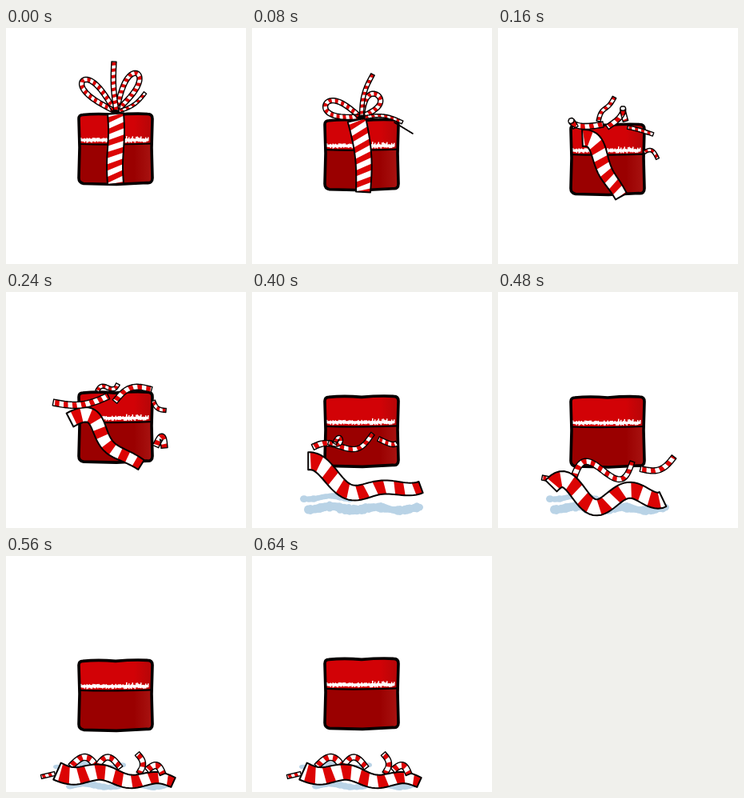
Write an HTML page with a canvas that moves like this. It is 300x295 px and loops after 0.72 s.

```html
<!DOCTYPE html>
<html lang="en">
<head>
<meta charset="utf-8">
<title>Unwrapping gift</title>
<style>
html, body { margin: 0; width: 100%; height: 100%; overflow: hidden; background: #fff; }
canvas { display: block; width: 300px; height: 295px; }
</style>
</head>
<body>
<canvas id="stage" width="300" height="295"></canvas>
<script>
const ctx = document.getElementById('stage').getContext('2d');
const STEP = 80, TICKS = 9, SAMPLES = 48, TAU = Math.PI * 2;
const BLACK = '#050000', RED = '#dc0404', SNOW = '#b9d3e6';

const mix = (a, b, t) => a + (b - a) * t;
const noise = n => { const v = Math.sin(n * 91.7) * 4375.5; return v - Math.floor(v); };
const sample = f => Array.from({ length: SAMPLES + 1 }, (_, i) => f(i / SAMPLES));

// A ribbon from one point to another, swinging sideways as a sine wave.
function strand(x0, y0, x1, y1, amp = 0, { cycles = 0.5, phase = 0, decay = 0, w = 7, endW = w } = {}) {
  const dx = x1 - x0, dy = y1 - y0, len = Math.hypot(dx, dy);
  return sample(t => {
    const off = amp * Math.sin(TAU * (cycles * t + phase)) * (1 - t) ** decay / len;
    return [x0 + dx * t - dy * off, y0 + dy * t + dx * off, mix(w, endW, t)];
  });
}

// A ribbon loop that leaves the knot, rounds its tip and returns.
function petal(x, y, tipX, tipY, spread, w = 6) {
  const dx = tipX - x, dy = tipY - y, len = Math.hypot(dx, dy);
  return sample(t => {
    const along = Math.sin(Math.PI * t), off = spread * Math.sin(TAU * t) / len;
    return [x + dx * along - dy * off, y + dy * along + dx * off, w];
  });
}

const wrapped = {
  slant: 8, period: 15,
  band: strand(137, 107, 137, 195, -1, { cycles: 1, w: 20 }),
  thin: [
    petal(136, 104, 96, 66, 8),
    petal(138, 104, 164, 57, 8),
    strand(138, 104, 135, 42, -2, { w: 6 }),
    strand(141, 104, 174, 81, 4, { w: 4 })
  ]
};

const loosened = {
  slant: 8, period: 15,
  band: strand(131, 115, 139, 205, -4, { w: 23, endW: 18 }),
  thin: [
    petal(135, 111, 92, 96, 9),
    petal(137, 111, 157, 84, 9),
    strand(137, 109, 151, 58, -4, { w: 5 }),
    strand(140, 112, 188, 118, -5, { w: 4 }),
    strand(178, 118, 201, 132, 0, { w: 0.4 })
  ]
};

const slipping = {
  slant: 0, period: 21,
  band: strand(80, 160, 169, 216, -30, { cycles: 1, decay: 2, w: 19, endW: 14 }),
  thin: [
    strand(59, 138, 128, 130, 7, { w: 8 }),
    strand(136, 137, 182, 122, -10),
    strand(114, 124, 140, 115, -4, { cycles: 1, w: 5 }),
    strand(184, 136, 200, 148, 4, { w: 5 }),
    strand(187, 193, 198, 195, -13, { w: 8 })
  ]
};

const falling = {
  slant: 5, period: 24,
  band: strand(74, 180, 216, 229, 34, { w: 24, endW: 10 }),
  thin: [
    strand(58, 154, 134, 142, 24, { decay: 0.4, w: 7, endW: 5 }),
    petal(136, 144, 159, 137, 9, 5),
    strand(138, 146, 142, 172, -5, { w: 5 }),
    strand(184, 173, 217, 164, 5, { w: 5 })
  ]
};

const landing = {
  slant: 3, period: 24,
  band: strand(66, 252, 206, 259, 20, { cycles: 1.6, phase: -0.42, decay: 0.6, w: 20 }),
  thin: [
    strand(94, 234, 168, 212, -17, { cycles: 1, w: 8, endW: 6 }),
    strand(55, 232, 70, 235, 0, { w: 6 }),
    strand(178, 221, 220, 206, 9, { w: 7 })
  ]
};

const settled = {
  slant: 3, period: 23,
  band: strand(64, 269, 209, 283, 4, { cycles: 2, w: 23, endW: 13 }),
  thin: [
    strand(81, 263, 115, 266, -13, { w: 8 }),
    strand(112, 266, 143, 265, -14),
    strand(44, 276, 61, 272, 0, { w: 5 }),
    strand(164, 247, 166, 272, -6),
    strand(176, 268, 196, 273, -9, { w: 8 })
  ]
};

const halfway = (a, b) => a.map((p, i) => p.map((v, k) => mix(v, b[i][k], 0.5)));
const between = (a, b) => ({
  slant: mix(a.slant, b.slant, 0.5),
  period: mix(a.period, b.period, 0.5),
  band: halfway(a.band, b.band),
  thin: a.thin.slice(0, b.thin.length).map((path, i) => halfway(path, b.thin[i]))
});

const poses = [
  wrapped, loosened, between(loosened, slipping), slipping,
  falling, between(falling, landing), landing, settled, settled
];

// The box sinks and springs back along one parabola.
const boxTop = tick => 131 - 23.5 * ((tick - 6) / 6) ** 2;

function polygon(pts) {
  ctx.beginPath();
  pts.forEach(([x, y]) => ctx.lineTo(x, y));
  ctx.closePath();
}

function ribbon(path, period, slant, line) {
  const lens = [0];
  for (let i = 1; i <= SAMPLES; i++) {
    lens.push(lens[i - 1] + Math.hypot(path[i][0] - path[i - 1][0], path[i][1] - path[i - 1][1]));
  }
  const total = lens[SAMPLES];
  const side = sign => path.map(([x, y, w], i) => {
    const a = path[Math.max(0, i - 1)], b = path[Math.min(SAMPLES, i + 1)];
    const dx = b[0] - a[0], dy = b[1] - a[1], k = sign * w / 2 / (Math.hypot(dx, dy) || 1);
    return [x - dy * k, y + dx * k];
  });
  const left = side(1), right = side(-1);
  const pointAt = (edge, s) => {
    s = Math.max(0, Math.min(total, s));
    let i = 1;
    while (i < SAMPLES && lens[i] < s) i++;
    const t = (s - lens[i - 1]) / (lens[i] - lens[i - 1] || 1);
    return [0, 1].map(k => mix(edge[i - 1][k], edge[i][k], t));
  };

  const outline = [...left, ...right.slice().reverse()];
  polygon(outline);
  ctx.fillStyle = '#fff';
  ctx.fill();

  ctx.fillStyle = RED;
  for (let s = period / 4 - slant; s < total; s += period) {
    const cut = [0, 1, 2, 3].map(n => n / 6 * period);
    polygon([
      ...cut.map(d => pointAt(left, s + slant + d)),
      ...cut.reverse().map(d => pointAt(right, s + d))
    ]);
    ctx.fill();
  }

  polygon(outline);
  ctx.strokeStyle = BLACK;
  ctx.lineWidth = line;
  ctx.stroke();
}

// Uneven streak of shadow on the snow.
function streak(x0, x1, y, size) {
  ctx.fillStyle = SNOW;
  for (let x = x0; x < x1; x += 3) {
    ctx.beginPath();
    ctx.ellipse(x, y + Math.sin(x / 9) * 2, 5, size * (0.7 + 0.4 * noise(x)), 0, 0, TAU);
    ctx.fill();
  }
}

function drawShadow(tick) {
  if (tick < 4) return;
  if (tick === 4) return streak(60, 215, 270, 5);
  if (tick < 7) {
    streak(65, 125, 257, 4);
    streak(70, 145, 270, 6);
    streak(110, 210, 271, 6);
    return;
  }
  streak(80, 205, 287, 4);
  streak(64, 146, 262, 3);
}

function drawBox(y) {
  const shape = new Path2D('M96 1 Q115 -1 137 1 Q160 -1 177 0 Q183 0 183 6 L182 42 L183 80 Q183 87 176 86 L138 88 L97 87 Q91 86 91 80 L92 42 L91 6 Q91 1 96 1Z');
  const shaded = (from, to) => {
    const g = ctx.createLinearGradient(160, 0, 183, 0);
    g.addColorStop(0, from);
    g.addColorStop(1, to);
    return g;
  };
  ctx.save();
  ctx.translate(0, y);
  ctx.save();
  ctx.clip(shape);
  ctx.fillStyle = shaded('#d20206', '#b40608');
  ctx.fillRect(88, -3, 98, 42);
  ctx.fillStyle = shaded('#9a0000', '#a81412');
  ctx.fillRect(88, 37, 98, 54);
  ctx.restore();

  // Frosted rim of the lid
  ctx.fillStyle = '#fff';
  ctx.fillRect(93, 31, 85, 3);
  for (let x = 93; x < 178; x += 1.5) {
    const up = noise(x) * (x > 148 ? 4 : 2), down = noise(x + 40) * 2.5;
    ctx.fillRect(x, 31.5 - up, 1.5, 2 + up + down);
  }

  ctx.strokeStyle = BLACK;
  ctx.lineWidth = 2.2;
  ctx.beginPath();
  ctx.moveTo(92, 37.5);
  ctx.quadraticCurveTo(130, 39, 182, 37);
  ctx.stroke();
  ctx.lineWidth = 3.6;
  ctx.stroke(shape);
  ctx.restore();
}

function drawKnot(y) {
  ctx.fillStyle = BLACK;
  ctx.beginPath();
  ctx.ellipse(137, y, 5, 2.5, 0, 0, TAU);
  ctx.fill();
}

function draw(tick) {
  const pose = poses[tick], top = boxTop(tick), tied = tick < 2, fallen = tick >= 4;
  const band = () => ribbon(pose.band, pose.period, pose.slant, 2);
  const thin = path => ribbon(path, path[0][2] > 6 ? 11 : 8, 1, 1.4);

  ctx.fillStyle = '#fff';
  ctx.fillRect(0, 0, 300, 295);
  ctx.lineJoin = ctx.lineCap = 'round';
  drawShadow(tick);
  drawBox(top);
  if (!fallen) band();
  pose.thin.slice(0, 4).forEach(thin);
  if (tied) drawKnot(top - 3);
  if (fallen) band();
  pose.thin.slice(4).forEach(thin);
}

function loop() {
  draw(Math.floor(performance.now() / STEP) % TICKS);
  requestAnimationFrame(loop);
}
loop();
</script>
</body>
</html>
```
